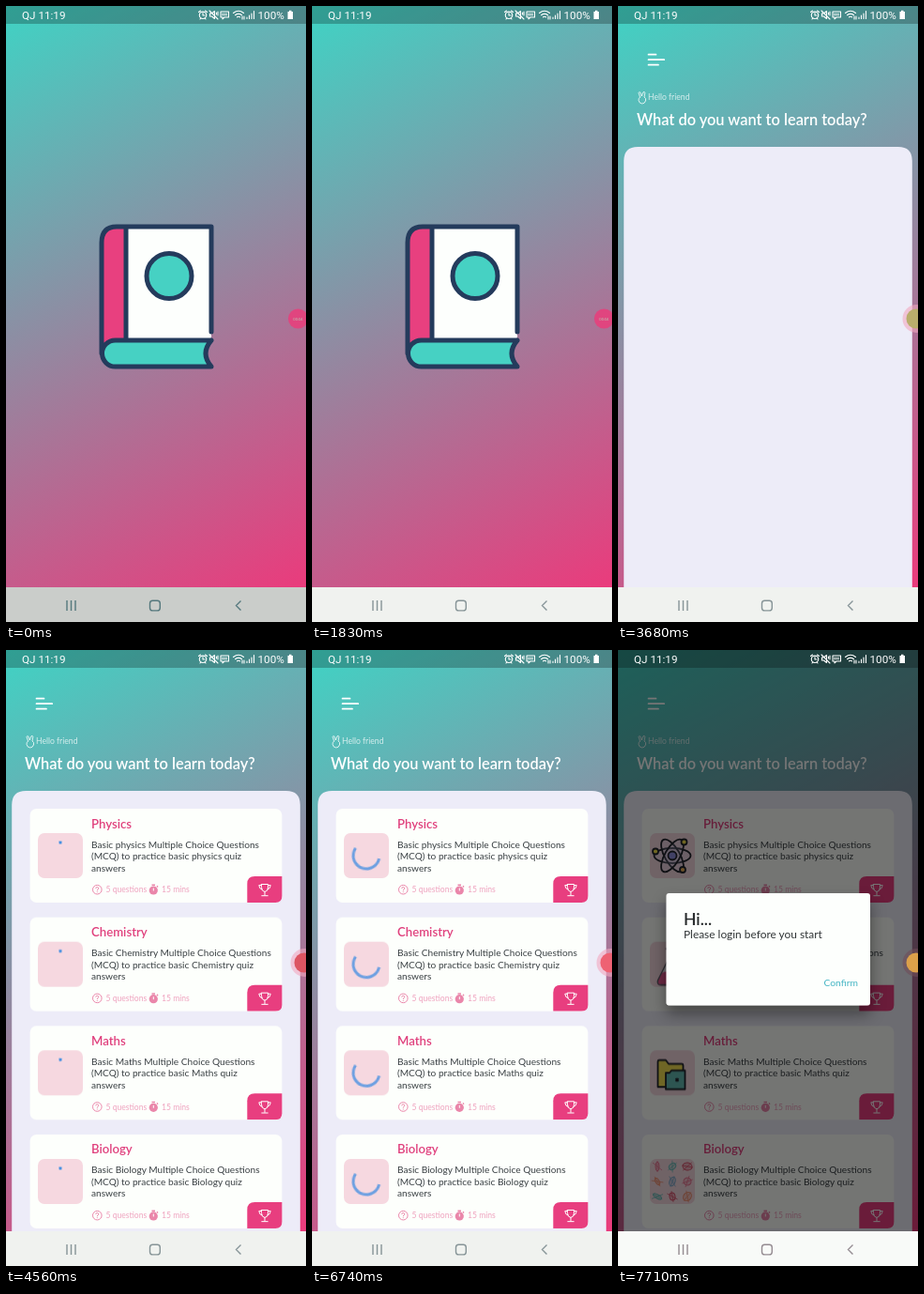
Animation, 320 px wide and 656 px high, one loop 8000 ms. Source, as an HTML page:

```html
<!DOCTYPE html>
<html lang="en">
<head>
<meta charset="utf-8">
<title>Quiz app</title>
<style>
  html, body { margin: 0; height: 100%; overflow: hidden; }
  svg { display: block; width: 100%; height: 100%; }
  text { font-family: Lato, "Open Sans", sans-serif; }
  .sys { font: 11.7px Roboto, sans-serif; fill: #fff; }
  .ink { fill: none; stroke: #243b5c; stroke-width: 5; stroke-linecap: round; stroke-linejoin: round; }
  .line { fill: none; stroke: #fff; stroke-linecap: round; stroke-linejoin: round; }
  .name { font-size: 13.2px; font-weight: 600; fill: #e0407d; }
  .desc { font-size: 10.15px; fill: #3a4044; }
  .info { font-size: 8.6px; fill: #efa3bf; }
  .art { stroke: #20242c; stroke-width: 1.8; stroke-linejoin: round; }

  #nav, #keys, #home, #list, .pic, .spin, #dim, #dialog, #rec, .dock, #dot {
    animation: 8s linear infinite;
  }
  #nav { animation-name: nav; animation-timing-function: step-end; }
  #keys { animation-name: keys; animation-timing-function: step-end; }
  #home { animation-name: home; }
  #list { animation-name: list; animation-timing-function: step-end; }
  .pic { animation-name: pic; animation-timing-function: step-end; }
  .spin {
    animation-name: spin; fill: none; stroke: #3f8de2; stroke-width: 3;
    transform-box: fill-box; transform-origin: center;
  }
  #dim, #dialog { animation-name: dialog; }
  #rec { animation-name: rec; animation-timing-function: step-end; }
  .dock { animation-name: dock; animation-timing-function: step-end; }
  #dot { animation-name: dot; animation-timing-function: step-end; }

  @keyframes nav {
    0% { fill: #cacdca; } 1.2% { fill: #dfe1de; } 2.5% { fill: #f0f2ef; }
    96.2%, 100% { fill: #f8faf8; }
  }
  @keyframes keys {
    0% { stroke: #54787d; } 2.5% { stroke: #869497; }
    96.2%, 100% { stroke: #948b91; }
  }
  @keyframes home {
    0%, 40.49% { opacity: 0; }
    40.5% { opacity: .15; animation-timing-function: steps(4); }
    45.85%, 100% { opacity: 1; }
  }
  @keyframes list { 0% { opacity: 0; } 55.5%, 100% { opacity: 1; } }
  @keyframes pic {
    0% { opacity: 0; } 86.75% { opacity: .25; } 88.1% { opacity: .65; }
    89.5% { opacity: .96; } 92.2%, 100% { opacity: 1; }
  }
  @keyframes spin {
    0%, 77.19% { transform: rotate(-96deg); stroke-dasharray: 12 348; opacity: 1; }
    77.2% {
      transform: rotate(-56deg); stroke-dasharray: 104 256; opacity: 1;
      animation-timing-function: steps(8);
    }
    88.1% { transform: rotate(54deg); stroke-dasharray: 262 98; opacity: .6; animation-timing-function: step-end; }
    89.5% { transform: rotate(62deg); stroke-dasharray: 266 94; opacity: .35; animation-timing-function: step-end; }
    92.2% { transform: rotate(80deg); stroke-dasharray: 250 110; opacity: .15; animation-timing-function: step-end; }
    93.6%, 100% { transform: rotate(90deg); stroke-dasharray: 230 130; opacity: 0; }
  }
  @keyframes dialog {
    0%, 92.19% { opacity: 0; }
    92.2% { opacity: .2; animation-timing-function: steps(3); }
    96.2%, 100% { opacity: 1; }
  }
  @keyframes rec { 0% { opacity: 1; } 27%, 100% { opacity: 0; } }
  @keyframes dock {
    0% { opacity: 0; transform: translateX(-4px); }
    27% { opacity: 1; transform: translateX(-3px); }
    28.3%, 100% { opacity: 1; transform: none; }
  }
  @keyframes dot {
    0% { fill: #e0457f; } 45.85% { fill: #b9ad6c; } 48.7% { fill: #dc5562; }
    77.2% { fill: #ee6273; } 89.5% { fill: #ec5963; } 96.2%, 100% { fill: #dba04a; }
  }
</style>
</head>
<body>
<svg viewBox="0 0 320 656" preserveAspectRatio="none">
  <defs>
    <linearGradient id="sky" gradientUnits="userSpaceOnUse" x1="0" y1="0" x2="320" y2="619">
      <stop stop-color="#3fd3c4"/><stop offset="1" stop-color="#ea3b7c"/>
    </linearGradient>
    <filter id="shade" x="-20%" y="-20%" width="140%" height="160%">
      <feDropShadow dx="0" dy="9" stdDeviation="8" flood-opacity=".4"/>
    </filter>
  </defs>

  <rect width="320" height="656" fill="url(#sky)"/>

  <g id="book">
    <path d="M128 235H118Q102 235 102 252V369L128 356Z" fill="#e8407f"/>
    <path d="M128 235H219V356H128Z" fill="#fdfffd"/>
    <path d="M219 356H116.500a14 14 0 0 0 0 28H219Q207 370 219 356Z" fill="#46d1c3"/>
    <path class="ink" d="M219 347V235H118Q102 235 102 252V370M128 235V356M219 356H116.500a14 14 0 0 0 0 28H219Q207 370 219 356"/>
    <circle class="ink" cx="174" cy="287.500" r="24" style="fill:#46d1c3"/>
  </g>

  <g id="home">
    <rect width="320" height="656" fill="url(#sky)"/>
    <path class="line" stroke-width="1.700" d="M32.500 51.700H40.500M32.500 57.200H49.200M32.500 62.700H43"/>
    <path class="line" stroke-width=".8" d="M23.500 97L22 92.500Q22.500 91 23.800 92L25.300 96L27 91.700Q28.500 91 28.800 92.300L28 97Q30.300 98 29.500 101Q28.500 104 25.500 104Q22.500 103.500 22 100.500Q21.800 98 23.500 97"/>
    <text x="32" y="100.300" font-size="8.600" fill="#fff" fill-opacity=".75">Hello friend</text>
    <text x="20" y="126.500" font-size="16.400" font-weight="600" fill="#fff">What do you want to learn today?</text>
    <path d="M6.200 656V165Q6.200 150 21.200 150H298.800Q313.800 150 313.800 165V656Z" fill="#edecf8"/>
    <g id="list"></g>
  </g>

  <rect width="320" height="19" fill="#000" fill-opacity=".25"/>
  <circle class="dock" cx="318.500" cy="333" r="15" fill="#f2a9c0" fill-opacity=".6"/>
  <rect id="dim" width="320" height="656" fill="#000" fill-opacity=".54"/>

  <g id="rec">
    <circle cx="311.500" cy="333" r="10.500" fill="#e0457f"/>
    <text x="311.500" y="334.500" font-size="4" text-anchor="middle" fill="#b9c9b4">00:04</text>
  </g>
  <g class="dock"><circle id="dot" cx="318" cy="333" r="10.500"/></g>

  <g id="dialog">
    <rect x="51.500" y="259" width="217.500" height="119.500" rx="3" fill="#fdfffd" filter="url(#shade)"/>
    <text x="70" y="293" font-size="17.500" font-weight="600" fill="#25282a">Hi...</text>
    <text x="70" y="307" font-size="11.900" fill="#303436">Please login before you start</text>
    <text x="219.500" y="357.500" font-size="10.300" fill="#45b5c4">Confirm</text>
  </g>

  <g id="status">
    <text class="sys" x="17" y="14">QJ 11:19</text>
    <text class="sys" x="268.500" y="14">100%</text>
    <g class="line" stroke-width="1.100">
      <circle cx="210" cy="9.800" r="3.700"/>
      <path d="M210 7.500V10H212M205.500 6.500L207.500 5M214.500 6.500L212.500 5M207 14L207.800 13M213 14L212.200 13"/>
      <path d="M217.500 8H219.500L222.500 5.500V13.500L219.500 11H217.500ZM217 5L226 14M224.500 7V9M226 6V10"/>
      <path d="M229 6H237.500V12H233L231 13.800V12H229ZM231 8V10M233 8V10M235 8V10"/>
      <path d="M242.500 7.500Q248 3 253.500 7.500M244.500 9.700Q248 7 251.500 9.700M246.500 11.800Q248 10.700 249.500 11.800M252 11V14M254 11V14"/>
      <path d="M257 12V13.500M259.500 10V13.500M262 8V13.500M264.500 5.500V13.500"/>
    </g>
    <path d="M300.500 6H302V4.800H304.500V6H306V14H300.500Z" fill="#fff"/>
  </g>

  <rect id="nav" y="619" width="320" height="37"/>
  <g id="keys" fill="none" stroke-width="1.400">
    <path d="M65 633V644M69.500 633V644M74 633V644M250.500 633.500L245.500 638.500L250.500 643.500"/>
    <rect x="153.500" y="633.300" width="10.800" height="10.600" rx="3"/>
  </g>
</svg>

<script>
  const orbit = a => `<ellipse cx="58" cy="219" rx="19.500" ry="8" transform="rotate(${a} 58 219)"/>`;
  const ball = (x, y, r, c) => `<circle cx="${x}" cy="${y}" r="${r}" fill="${c}"/>`;

  const atom = `<g class="art" fill="#c9c4ea" fill-opacity=".2">${[0, 60, 120].map(orbit).join('')}</g>
    <g class="art">${ball(58, 219, 4.5, '#8f8fdc')}${ball(40, 214.5, 3, '#f3e04a')}
    ${ball(70.5, 204.5, 3, '#f3e04a')}${ball(69, 234, 3, '#f0b45a')}</g>`;

  const flask = `<g stroke-linejoin="round">
    <path d="M53 203V215L42.500 236Q41 241 46 241H69Q74 241 72.500 236L62 215V203Z" fill="#f4f1f6"/>
    <path d="M47 228Q53 225 58 228T69 228L72.500 236Q74 241 69 241H46Q41 241 42.500 236Z" fill="#ea5a93"/>
    <path d="M53 203V215L42.500 236Q41 241 46 241H69Q74 241 72.500 236L62 215V203" fill="none" stroke="#5b5664" stroke-width="1.300"/>
    <path d="M51.500 202.500H63.500" stroke="#4d4956" stroke-width="2" stroke-linecap="round"/>
    <path d="M52 232L59 229L57 237Z" fill="#f9a6c3"/></g>${ball(65, 234, 2, '#f9b7cf')}`;

  const folder = `<g class="art">
    <path d="M42.500 234V207Q42.500 205.500 44 205.500H51L54 209.500H68Q69.500 209.500 69.500 211V234Z" fill="#f3e052"/>
    <path d="M51 236.500V219H55L57 216.500H71.500V236.500Z" fill="#62b9b2"/>
    <path d="M61.500 225L64.500 228M64.500 225L61.500 228"/></g>`;

  // Nine little cells in a 3 x 3 grid
  const tints = ['#e8728f', '#d8506a', '#7fa9c9', '#6dbcb8', '#f0906f'];
  const cells = Array.from({ length: 9 }, (_, i) => {
    const x = 42 + i % 3 * 16, y = 203 + (i / 3 | 0) * 16, c = tints[i * 3 % 5];
    return `<g transform="rotate(${i * 50} ${x} ${y})" stroke="${c}" fill="${c}" fill-opacity=".3">
      <ellipse cx="${x}" cy="${y}" rx="${2 + i % 3}" ry="${5 - i % 2}"/>
      <path d="M${x - 5} ${y - 4}L${x + 5} ${y + 4}M${x} ${y - 6}V${y + 6}" stroke-width=".7"/></g>`;
  }).join('');

  const card = ([name, topic, art], i) => `<g transform="translate(0 ${i * 115.65})">
    <rect x="25.600" y="169" width="268.800" height="100" rx="7" fill="#fdfffc"/>
    <rect x="34" y="195" width="48" height="48" rx="7" fill="#f6d8e0"/>
    <circle class="spin" cx="58" cy="219" r="14" pathLength="360"/>
    <g class="pic">${art}</g>
    <text class="name" x="91" y="189.500">${name}</text>
    <text class="desc"><tspan x="91" y="210.500">Basic ${topic} Multiple Choice Questions</tspan>
      <tspan x="91" y="223">(MCQ) to practice basic ${topic} quiz</tspan>
      <tspan x="91" y="235.500">answers</tspan></text>
    <circle cx="97.300" cy="255.200" r="4.800" fill="none" stroke="#ea86aa"/>
    <path d="M95.700 254Q95.900 252.500 97.300 252.500Q99 252.700 98.800 254.200Q97.300 255 97.300 256.300M97.300 257.300V258.200" fill="none" stroke="#ea86aa"/>
    <text class="info" x="106.500" y="258.300">5 questions</text>
    <g fill="#ea86aa"><circle cx="157.300" cy="256" r="4.600"/><path d="M155.500 249.500H159V251H155.500ZM160.500 251.500L161.500 250.700L162.500 252L161.500 253Z"/></g>
    <path d="M157.300 253.500V256.500" stroke="#fff"/>
    <text class="info" x="166" y="258.300">15 mins</text>
    <path d="M257.300 269V249Q257.300 241 265.300 241H294.400V262Q294.400 269 287.400 269Z" fill="#e83e7f"/>
    <path class="line" stroke-width="1" d="M272.500 249.500H279.500V253Q279.500 257 276 257.500Q272.500 257 272.500 253ZM272.500 250.500H269.800Q270 254.500 273 255M279.500 250.500H282.200Q282 254.500 279 255M276 257.500V261M272.800 261.700H279.200"/>
  </g>`;

  document.getElementById('list').innerHTML = [
    ['Physics', 'physics', atom],
    ['Chemistry', 'Chemistry', flask],
    ['Maths', 'Maths', folder],
    ['Biology', 'Biology', cells]
  ].map(card).join('');
</script>
</body>
</html>
```
